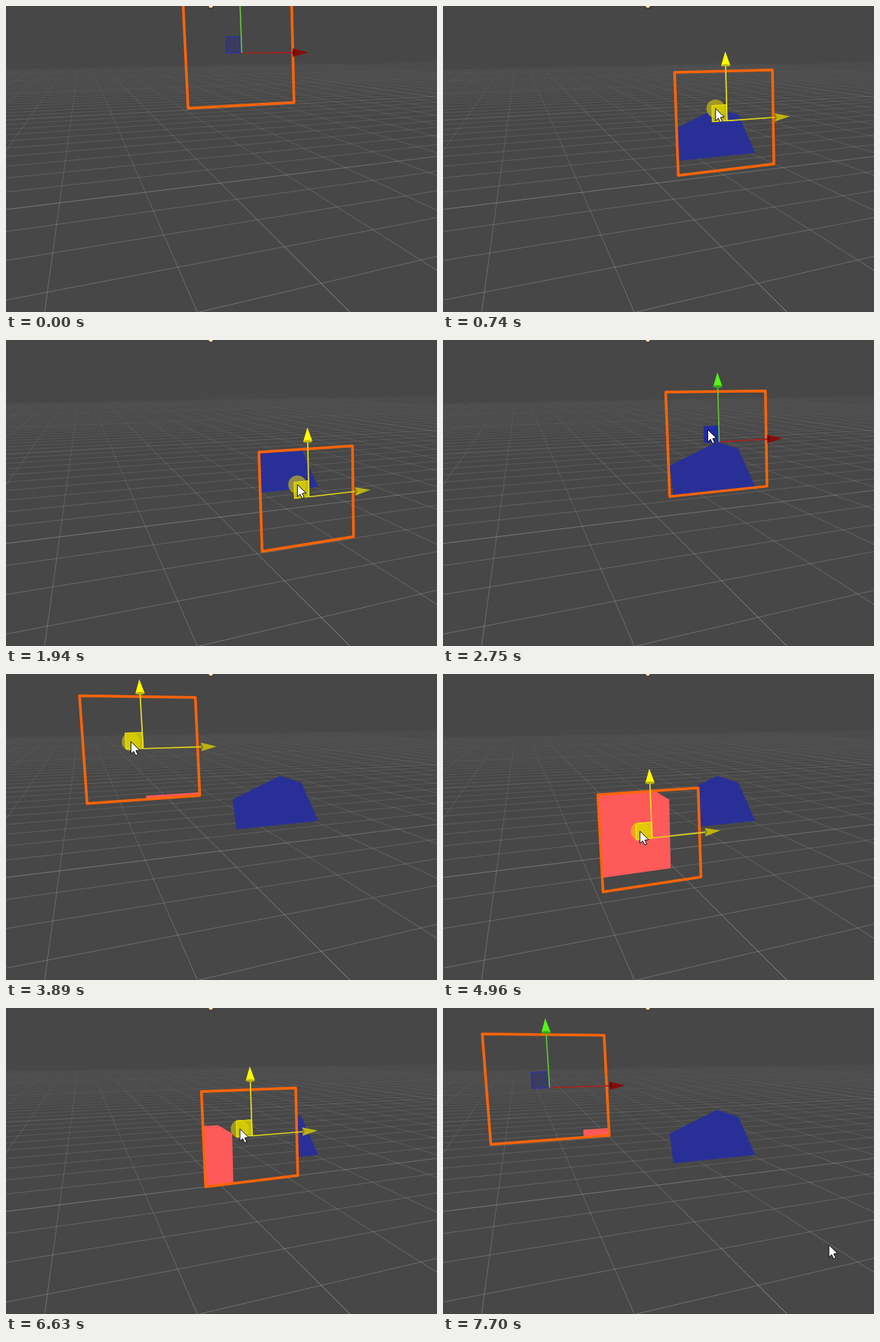
Write an HTML page with a canvas that moves like this. It is 564 px wide and 401 px high and loops after 7770 ms.

```html
<!DOCTYPE html>
<html lang="en">
<head>
<meta charset="utf-8">
<title>Stencil window</title>
<style>
  html, body { margin: 0; width: 100%; height: 100%; overflow: hidden; background: #474747; }
  canvas { display: block; }
</style>
</head>
<body>
<canvas id="stage" width="564" height="401"></canvas>
<script>
const LOOP = 7770, GRAB = 200, DROP = 2470, CUT = 2815, REGRAB = 3540, RELEASE = 7330;
const ctx = document.getElementById('stage').getContext('2d');

// Vanishing points of the three world axes
const VX = [1735, 52], VY = [522, 6100], VZ = [98, 50];

// The two takes: the pivot glides through points evenly spaced in time
const TAKES = [
  {
    start: 0, step: 268, size: .99, grip: [-15, -16],
    path: [[308, 61], [316, 68], [345, 118], [361, 158], [178, 182], [193, 202],
      [267, 243], [385, 215], [395, 170], [365, 138], [361, 133]]
  },
  {
    start: 3550, step: 340, size: .89, grip: [-16, -9],
    path: [[133, 91], [179, 97], [163, 210], [170, 216], [255, 215], [378, 212],
      [305, 222], [350, 190], [375, 208], [328, 169], [185, 140], [139, 104]]
  }
];

const BLUE = [[296, 164], [358, 133], [386, 142], [408, 192], [301, 203]];
const RED = [[183, 159], [277, 153], [295.5, 164], [297.5, 254], [190, 269]];
const ARROW = [[0, 0], [0, 16], [3.6, 12.7], [6.2, 18.2], [8.9, 17], [6.4, 11.6], [11.4, 11.2]];

const clamp = (v, lo, hi) => Math.min(hi, Math.max(lo, v));
const add = (a, b) => [a[0] + b[0], a[1] + b[1]];
const mix = (a, b, p) => [a[0] + (b[0] - a[0]) * p, a[1] + (b[1] - a[1]) * p];
const progress = (t, from, to) => clamp((t - from) / (to - from), 0, 1);

// Catmull-Rom spline
function pivotAt({ start, step, path }, t) {
  const last = path.length - 1;
  const s = clamp((t - start) / step, 0, last);
  const i = Math.min(Math.floor(s), last - 1), p = s - i;
  const [a, b, c, d] = [-1, 0, 1, 2].map(k => path[clamp(i + k, 0, last)]);
  return [0, 1].map(k => b[k] + p / 2 * (c[k] - a[k]
    + p * (2 * a[k] - 5 * b[k] + 4 * c[k] - d[k] + p * (3 * (b[k] - c[k]) + d[k] - a[k]))));
}

function pointerAt(t, held) {
  if (t < 65) return null;
  if (t < GRAB) return mix([428, 212], held, progress(t, 65, GRAB));
  if (t >= CUT && t < REGRAB) return mix([400, 170], held, progress(t, CUT, 3290));
  return mix(held, [504.5, 310], progress(t, RELEASE, 7695) ** 1.6);
}

function gizmoMode(t) {
  if (t >= DROP && t < CUT) return 'hover';
  const dragging = t >= GRAB && t < DROP || t >= REGRAB && t < RELEASE;
  return dragging ? 'drag' : 'idle';
}

function trace(points) {
  points.forEach((p, i) => i ? ctx.lineTo(...p) : ctx.moveTo(...p));
  ctx.closePath();
}

function shape(points, fill, stroke, width = 1) {
  ctx.beginPath();
  trace(points);
  if (fill) { ctx.fillStyle = fill; ctx.fill(); }
  if (stroke) { ctx.strokeStyle = stroke; ctx.lineWidth = width; ctx.stroke(); }
}

function line(a, b, color, width) {
  ctx.beginPath();
  ctx.moveTo(...a);
  ctx.lineTo(...b);
  ctx.strokeStyle = color;
  ctx.lineWidth = width;
  ctx.stroke();
}

function oval([x, y], rx, ry, fill) {
  ctx.beginPath();
  ctx.ellipse(x, y, rx, ry, 0, 0, 7);
  ctx.fillStyle = fill;
  ctx.fill();
}

// Grid lines dissolve towards the horizon
function haze(strength) {
  const g = ctx.createLinearGradient(0, 68, 0, 401);
  for (let p = 0; p <= 1; p += .125) {
    g.addColorStop(p, `rgba(255,255,255,${strength * p ** .65})`);
  }
  return g;
}

function drawGround() {
  const minor = haze(.22), major = haze(.36);
  for (let k = 0; k < 52; k++) {
    const y = 50 + 1 / (.00244 + .000547 * k);
    line([0, y], VX, k % 10 === 4 ? major : minor, 1);
  }
  for (let n = -14; n <= 20; n++) {
    line(VZ, [450 + 200 * n, 401], n % 10 ? minor : major, 1);
  }
  oval([267.5, -.5], 3.6, 3.6, '#2c2620');
  oval([267.5, -.8], 2.8, 2.8, '#f3d9b0');
}

// Corners of the window in perspective
function corners([x, y], size) {
  const near = size * (6048 * (VX[0] - x) + 1213 * (VX[1] - y)) / 9773296;
  return [[-.5, -.5], [.5, -.5], [.5, .5], [-.5, .5]].map(([u, v]) => {
    const a = u * .1125 * near, b = v * .0263 * near, w = 1 + a + b;
    return [(x + a * VX[0] + b * VY[0]) / w, (y + a * VX[1] + b * VY[1]) / w];
  });
}

function clipped(quad, inside, draw) {
  ctx.save();
  ctx.beginPath();
  if (!inside) ctx.rect(-1, -1, 566, 403);
  trace(quad);
  ctx.clip('evenodd');
  draw();
  ctx.restore();
}

function drawGizmo([x, y], mode) {
  const reach = 95 - .071 * (x - 193), side = .235 * reach;
  const slope = (VX[1] - y) / (VX[0] - x), lean = (x - VY[0]) / (VY[1] - y);
  const at = (r, up) => [x + r + up * lean, y + r * slope - up];
  const [xLine, xCone, xBase, yLine, yCone, yBase] = mode === 'drag'
    ? ['#dcd31c', '#bcb212', '#8b830f', '#eae61c', '#fffa00', '#b9b30c']
    : ['#a8201c', '#850d0d', '#5c0a0a', '#5fca35', '#55f416', '#37a512'];
  const [padFill, padEdge] = {
    drag: ['rgba(222,212,0,.8)', '#f4ee00'],
    hover: ['#222ba4', '#222ba4'],
    idle: ['#3a3b60', '#2030c0']
  }[mode];

  shape([at(0, 0), at(-side, 0), at(-side, 21), at(0, 21)], padFill, padEdge);
  line(at(0, 0), at(reach - 18, 0), xLine, 1.6);
  line(at(0, 0), at(0, 74), yLine, 1.6);
  shape([at(reach, 0), at(reach - 20, 5.5), at(reach - 20, -5.5)], xCone);
  shape([at(reach - 20, 5.5), at(reach - 17, 0), at(reach - 20, -5.5)], xBase);
  shape([at(0, 91), at(-6, 72.5), at(6, 72.5)], yCone);
  oval(at(0, 72.5), 6, 1.7, yBase);
}

function render(t) {
  const second = t >= CUT;
  const take = TAKES[+second];
  const pivot = pivotAt(take, t);
  const quad = corners(pivot, take.size);
  const mode = gizmoMode(t);
  const pointer = pointerAt(t, add(pivot, take.grip));

  ctx.setTransform(1, 0, 0, 1, 0, 0);
  ctx.fillStyle = '#474747';
  ctx.fillRect(0, 0, 564, 401);
  ctx.translate(.5, .5);
  ctx.lineJoin = 'round';

  drawGround();
  clipped(quad, !second, () => shape(BLUE, '#283098'));
  if (second) clipped(quad, true, () => shape(RED, '#ff5a5a'));
  shape(quad, null, '#ff6408', 3.5);

  if (mode === 'drag') oval(pointer, 12, 12, 'rgba(235,218,0,.55)');
  drawGizmo(pivot, mode);
  if (pointer) shape(ARROW.map(p => add(p, pointer)), '#fff', '#111');
}

const begin = performance.now();
function tick() {
  render((performance.now() - begin) % LOOP);
  requestAnimationFrame(tick);
}
tick();
</script>
</body>
</html>
```
